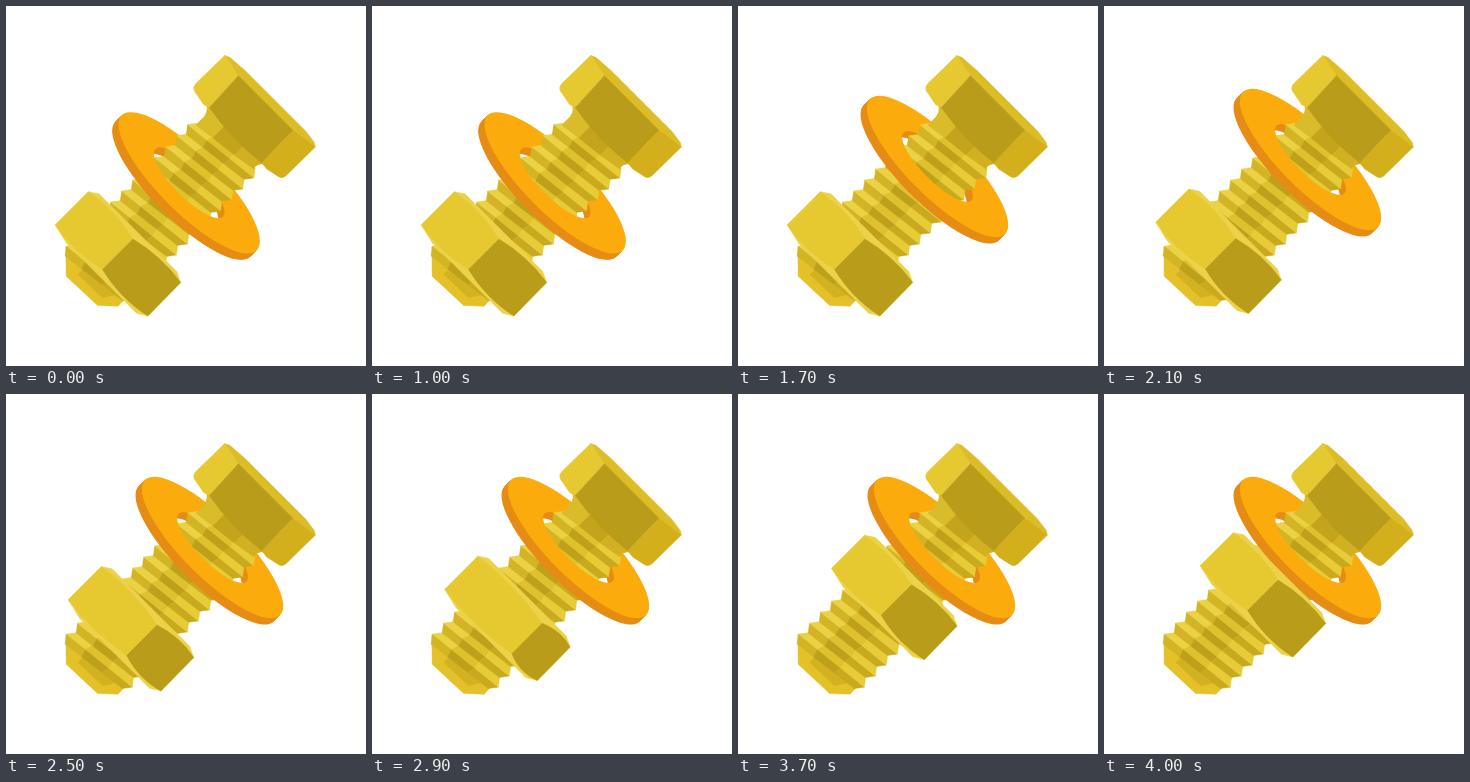
These frames come from a looping animation (360 by 360 pixels, 5 s). An HTML page with a canvas:

```html
<!DOCTYPE html>
<html>
<head>
<meta charset="utf-8">
<title>Bolt, washer and nut</title>
<style>
html, body { margin: 0; height: 100%; overflow: hidden; background: #fff; }
canvas { display: block; }
</style>
</head>
<body>
<canvas id="stage" width="360" height="360"></canvas>
<script>
const ctx = document.getElementById('stage').getContext('2d');
const LIGHT = '#e6c931', DARK = '#b89c1a', EDGE = '#ecd248';
const PITCH = 15.6, SLANT = 9;

// The drawing space is turned: x runs up along the bolt, y across it.
function fill(color, d) {
  const path = new Path2D(d);
  ctx.fillStyle = ctx.strokeStyle = color;
  ctx.lineWidth = 0.4;
  ctx.fill(path);
  ctx.stroke(path);
}

function thread(x) {
  const across = [-1, -0.42, 0.28, 1];
  const upper = ['#ebd244', '#dfc12d', '#e7cb37'];
  const lower = ['#d3b425', '#bfa01b', '#c9a91e'];
  const at = (dx, r, i) => `${x + dx + SLANT * (across[i] + 1) / 2} ${across[i] * r}`;
  for (let i = 0; i < 3; i++) {
    fill(lower[i], `M${at(-8, 36, i)}L${at(0, 42, i)}L${at(0, 42, i + 1)}L${at(-8, 36, i + 1)}Z`);
    fill(upper[i], `M${at(0, 42, i)}L${at(8, 36, i)}L${at(8, 36, i + 1)}L${at(0, 42, i + 1)}Z`);
  }
}

function shank() {
  fill('#e4c129', 'M-128 -42L-148.5 -21L-147 22L-133 37L-112 36L-120 -36Z');
  fill('#d3b222', 'M-139 -14L-138 20L-122 30L-126 -14Z');
  for (let k = 0; k < 12; k++) thread(-127 + k * PITCH);
  fill('#dabb29', 'M50 -36L62 -36Q70 -37 74 -46L74 -15L53 -15Z');
  fill('#c3a41c', 'M53 -15L74 -15L74 12L56 12Z');
  fill('#d1b022', 'M56 12L74 12L74 45Q70 35 62 35L60 36Z');
}

function head() {
  fill('#dcbd28', 'M119.5 -65L122 -60L123.5 -40L123.5 46L121.5 60L119 64L113 36L113 -41Z');
  fill(LIGHT, 'M120 -65L115 -41L72 -39L70 -45L73 -61Q74 -65 79 -65.5Z');
  fill('#d3b01b', 'M115 36L119 64L78 63.5Q73 63 72 59L69 45L70 37Z');
  fill(DARK, 'M115 -41L115 36L70 37Q65 0 72 -39Z');
}

function washer(shift) {
  const x = 4.5 + shift, thick = 9;
  for (let d = thick; d >= 0; d--) {
    ctx.beginPath();
    ctx.ellipse(x - d, 0, 29.5, 95.5, 0, 0, 7);
    ctx.closePath();
    ctx.moveTo(x - d + 14.5, 0);
    ctx.ellipse(x - d, 0, 14.5, 48, 0, 0, 7);
    ctx.fillStyle = d ? '#e68c14' : '#fbac0c';
    ctx.fill('evenodd');
  }
  // The part of the shank that comes out of the hole
  ctx.save();
  ctx.beginPath();
  ctx.ellipse(x, 0, 14.5, 48, 0, Math.PI / 2, Math.PI * 1.5);
  ctx.lineTo(200, -48);
  ctx.lineTo(200, 48);
  ctx.clip();
  shank();
  ctx.restore();
}

function nut(shift, ridge) {
  ctx.save();
  ctx.translate(shift, 0);
  fill(EDGE, 'M-73 -65L-67 -56L-67 54L-72 64.5L-119 65L-125 55L-125 -44L-120 -65Z');
  const left = (ridge - 64) / 2, right = (ridge + 64) / 2;
  fill(LIGHT, `M-73 -65Q-67 ${left} -75 ${ridge}L-118 ${ridge}Q-126 ${left} -120 -65Z`);
  fill(DARK, `M-75 ${ridge}Q-67 ${right} -72 64.5L-119 65Q-126 ${right} -118 ${ridge}Z`);
  ctx.restore();
}

const ramp = (t, from, to) => Math.min(1, Math.max(0, (t - from) / (to - from)));

function draw(now) {
  const t = Math.floor(now % 5000 / 100) * 100;
  const turn = ramp(t, 2000, 3800);
  ctx.setTransform(1, 0, 0, 1, 0, 0);
  ctx.clearRect(0, 0, 360, 360);
  ctx.translate(180, 180);
  ctx.rotate(-Math.PI / 4);
  shank();
  washer(33 * ramp(t, 1000, 2000));
  head();
  nut(66.5 * turn, 28 * (1 - Math.abs(2 * turn - 1)));
}

const start = performance.now();
function frame() {
  draw(performance.now() - start);
  requestAnimationFrame(frame);
}
frame();
</script>
</body>
</html>
```
